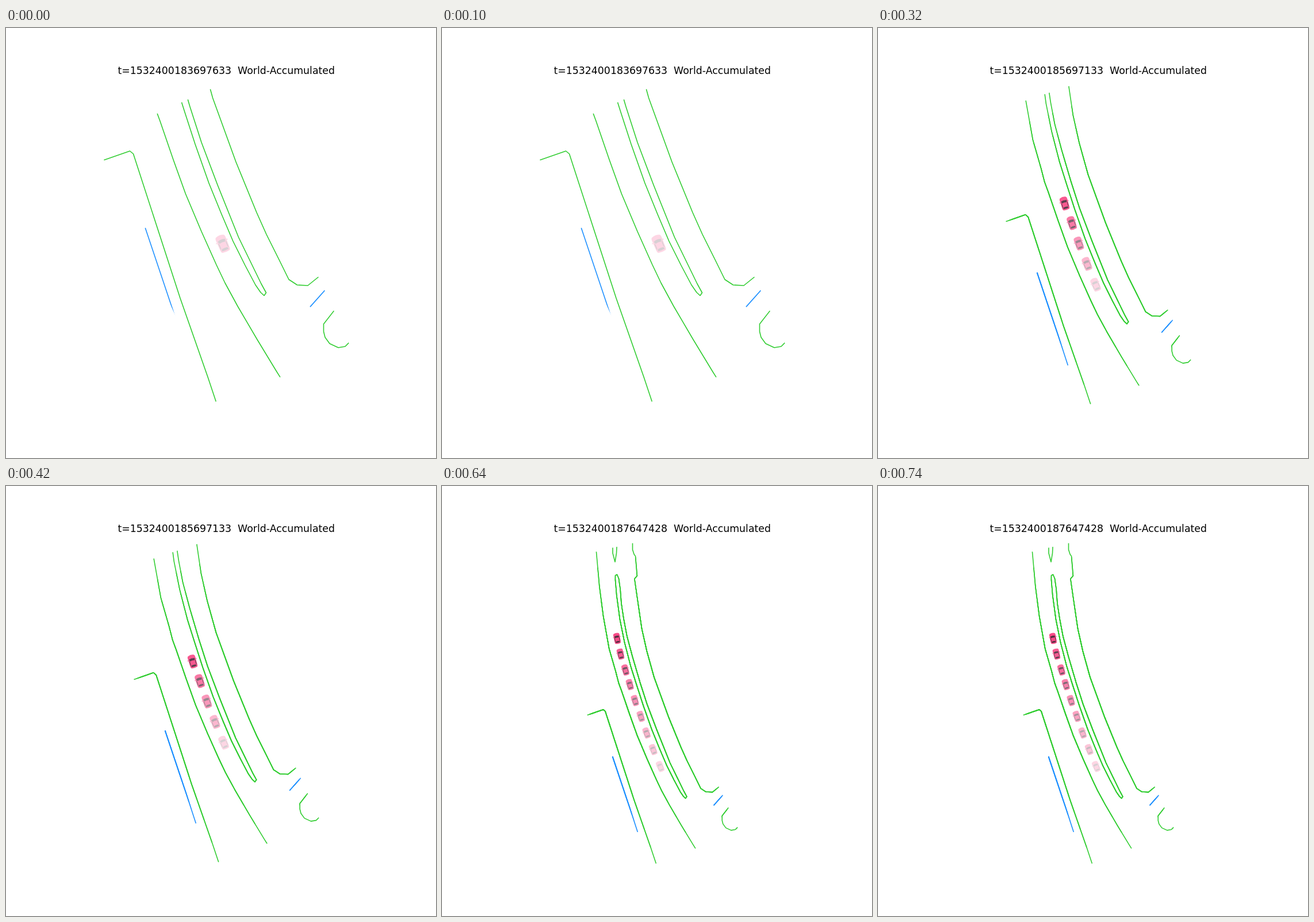
An HTML page for the animation above (800 ms loop, 748 px wide and 748 px high).

```html
<!DOCTYPE html>
<html lang="en">
<head>
<meta charset="utf-8">
<title>World-Accumulated</title>
<style>
  html, body { margin: 0; width: 100%; height: 100%; overflow: hidden; background: #fff; }
  svg { display: block; width: 100vw; height: 100vh; }
  text { font: 17.33px "DejaVu Sans", sans-serif; text-anchor: middle; fill: #000; }
  #map path {
    fill: none; stroke: #32cd32; stroke-width: 1.6;
    stroke-linejoin: round; stroke-linecap: square;
    vector-effect: non-scaling-stroke;
  }
  #map .crossing { stroke: #1e90ff; }
</style>
</head>
<body>
<svg viewBox="0 0 748 748">
  <defs>
    <g id="map">
      <!-- left curb -->
      <path d="M171 229.5 215.5 214 221.5 219 303 470 351 607 365 649"/>
      <!-- lane edge -->
      <path d="M196.2 -232 205 -134 216 -50 232.5 42 251 106 259.5 139 268 162 291 229 312.4 288.5 340 354 366 412 381 443.5 403 484 437 542 471 598 477 607.5"/>
      <!-- median -->
      <path d="M249.8 -155 253.6 -110 262.8 -42 275.8 22.5 294 93 310.5 145 329 202 353 270 375 324 395 371 416 413 434 447 443 460 449 465.5 452.5 460.5 444 445 425 406 404.5 364 368 273 340 199 320 137 298.5 64 283 6 273.5 -44 267 -87 264 -127 259.7 -157 254.8 -168.6 250 -166Z"/>
      <path d="M242.6 -243.5V-229L249.1 -204.4 253.2 -229 254 -246"/>
      <!-- right curb -->
      <path d="M298.8 -256V-239L303 -226 307 -220.5 311.7 -165 304.3 -156.5 314.8 -84 325 -15 339.2 48.5 359.7 122 400 233 436 321 453 359 475 403 492 437.5 506.5 447 525 448 543 433.5"/>
      <path d="M570 492.5 552.5 515V528L555 538 563 549 578 556 590 554 596 548"/>
      <path class="crossing" d="M242.5 348.5 290 490 314 563.5"/>
      <path class="crossing" d="M555 456 529.5 484.5"/>
    </g>
    <g id="car">
      <path fill="#f73a7c" d="M-7 -14Q0 -17 7 -14 9 -13 9 -9L8.6 10Q8.6 14 6.5 15 0 16.5 -6.5 15 -8.6 14 -8.6 10L-9 -9Q-9 -13 -7 -14ZM-8.5 -5.5 -11 -4.5 -10.8 -3 -8.5 -3.5ZM8.5 -5.5 11 -4.5 10.8 -3 8.5 -3.5Z"/>
      <path fill="#3d1a2c" d="M-7 -6Q0 -9 7 -6L5.2 -1.5Q0 -3 -5.2 -1.5ZM-5 8.5Q0 7.5 5 8.5L6.3 12Q0 13 -6.3 12ZM-7.4 -4 -5.9 0V7L-7.2 10ZM7.4 -4 5.9 0V7L7.2 10Z"/>
    </g>
  </defs>
  <text id="title" x="383.2" y="79.6"></text>
  <g id="world"></g>
</svg>
<script>
const STEP = 160, MID = 383.5, BASE = 649;
const HALF_W = 127.1, HALF_L = 253;

// x, y and heading of the car at each snapshot
const poses = [
  [377, 375, 24.7], [357, 327, 22.9], [338.4, 280, 21.1],
  [322, 233, 19.8], [305.5, 188, 18.5], [291, 143, 18],
  [278.4, 101.5, 17.4], [264.6, 56.5, 15.4], [254.8, 12.2, 13.4]
];

// timestamp, zoom and lower edge of each view
const views = [
  ["1532400183697633", 1, 649],
  ["1532400184697364", 0.8605, 651.5],
  ["1532400185697133", 0.7555, 653.4],
  ["1532400186647118", 0.675, 655],
  ["1532400187647428", 0.614, 656]
];

const title = document.getElementById("title");
const world = document.getElementById("world");
const defs = document.querySelector("defs");

function add(parent, tag, attrs) {
  const el = document.createElementNS("http://www.w3.org/2000/svg", tag);
  for (const key in attrs) el.setAttribute(key, attrs[key]);
  return parent.appendChild(el);
}

const place = ([x, y, angle]) => `translate(${x} ${y}) rotate(${-angle})`;

// each snapshot reveals the map inside a window turned with the car
const patches = poses.map((pose, i) => {
  const clip = add(defs, "clipPath", { id: "window" + i });
  add(clip, "rect", {
    x: -HALF_W, y: -HALF_L, width: 2 * HALF_W, height: 2 * HALF_L,
    transform: place(pose)
  });
  const patch = add(world, "g", { "clip-path": `url(#window${i})` });
  add(patch, "use", { href: "#map" });
  return patch;
});

const cars = poses.map(([x, y, angle]) =>
  add(world, "use", { href: "#car", transform: place([x, y, angle - 2]) }));

function draw(time) {
  const index = Math.floor(time / STEP) % views.length;
  const [stamp, zoom, bottom] = views[index];
  const count = 2 * index + 1;
  title.textContent = `t=${stamp}\u00a0\u00a0World-Accumulated`;
  world.setAttribute("transform",
    `translate(${MID} ${bottom}) scale(${zoom}) translate(${-MID} ${-BASE})`);
  poses.forEach((_, i) => {
    const shown = i < count ? "inline" : "none";
    patches[i].setAttribute("display", shown);
    cars[i].setAttribute("display", shown);
    cars[i].setAttribute("opacity", 0.2 + 0.8 * i / count);
  });
}

const start = performance.now();
function tick(now) {
  draw(Math.max(0, now - start));
  requestAnimationFrame(tick);
}
draw(0);
requestAnimationFrame(tick);
</script>
</body>
</html>
```
